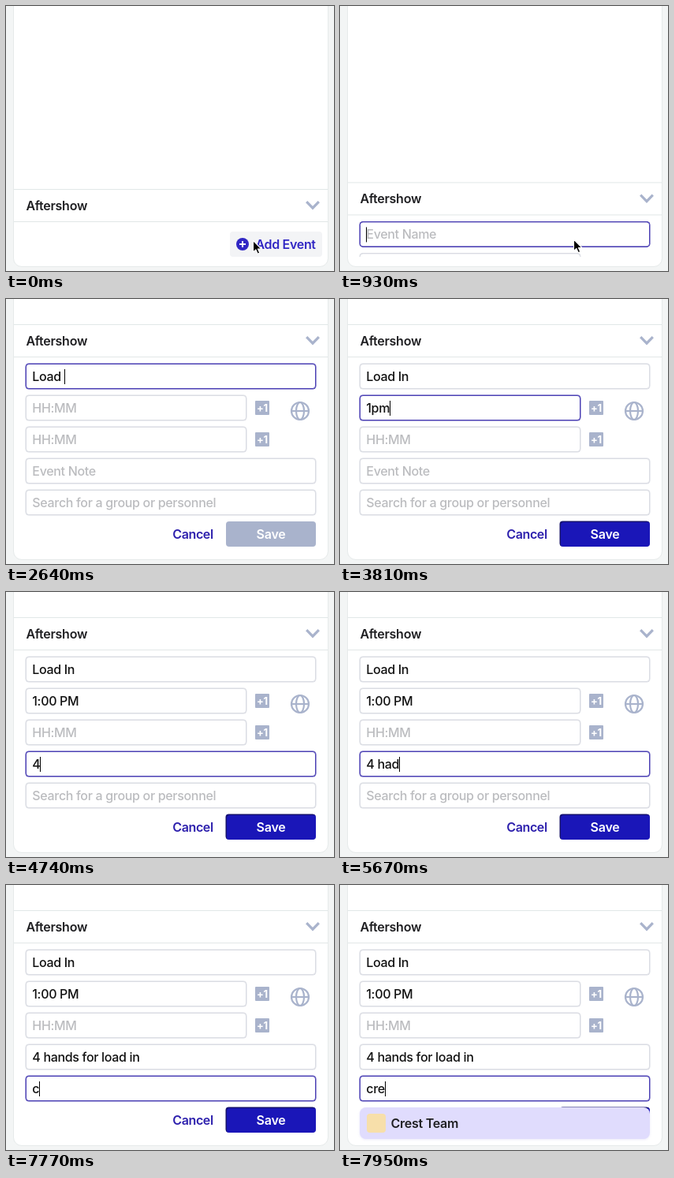
Recreate the animation shown at these times as an HTML page. Size 416x336 px, loop 8 s.

```html
<!DOCTYPE html>
<html lang="en">
<head>
<meta charset="utf-8">
<title>Add event form</title>
<style>
  :root { --mute: #a9b3cc; --blue: #3127c4; --ink: #1f1f22; }
  html, body { margin: 0; width: 100%; height: 100%; overflow: hidden; background: #f3f5f5; }
  body { font: 500 16px/20px Inter, "Liberation Sans", sans-serif; letter-spacing: -.02em; color: #111; }
  #stage { position: relative; width: 416px; height: 336px; overflow: hidden; }
  #stage * { box-sizing: border-box; }
  .abs, .field, .plus, .btn { position: absolute; }
  .strong { font-weight: 600; letter-spacing: -.016em; white-space: pre; }
  .card { left: 9px; top: -20px; width: 400px; height: 351px; background: #fff; border: 1px solid #e6eaea; border-radius: 11px; }
  #row { left: 10px; top: 32px; width: 398px; height: 42px; border: solid #e1e7e7; border-width: 1px 0; color: var(--ink); }
  #row span { left: 15.4px; top: 10px; }
  #row svg { left: 370px; top: 13px; }
  #form { inset: 0; }
  .field { --line: #dadce3; left: 25px; width: 368px; height: 32px; padding-left: 7.3px; display: flex; align-items: center;
    background: #fff; border: 1px solid var(--line); box-shadow: 0 0 0 .5px var(--line); border-radius: 4px; white-space: pre; }
  .field.short { width: 280px; }
  .field.on { --line: #4a3fb4; }
  .field i { width: 1px; height: 19px; margin-right: -1px; background: #000; visibility: hidden; }
  .field em { font-style: normal; color: #bbbcbf; }
  .plus { left: 316px; width: 18px; height: 18px; border-radius: 1px; background: var(--mute); color: #fff;
    font: 700 13px/18px Inter, "Liberation Sans", sans-serif; text-align: center; }
  .btn { display: flex; align-items: center; justify-content: center; border-radius: 4px; }
  #add { left: 284px; top: 286px; width: 117px; height: 32px; background: #f3f4f6; color: var(--blue); letter-spacing: -.02em; }
  #add svg { position: absolute; left: 8px; top: 8px; }
  #add span { position: absolute; left: 32.5px; }
  #cancel { left: 203px; top: 282px; width: 68px; height: 32px; color: #2d20ad; letter-spacing: -.025em; }
  #save { left: 279px; top: 282px; width: 114px; height: 32px; color: #fff; }
  #save.live { box-shadow: -.5px -.5px 0 #14106c, inset 1px 1px 0 #14106c; }
  #list { left: 25px; top: 282px; width: 368px; height: 40px; border-radius: 8px; background: #e0dcfd;
    box-shadow: 0 1px 3px rgba(120, 110, 220, .15); color: var(--ink); }
  #list b { position: absolute; left: 9px; top: 8px; width: 24px; height: 24px; border-radius: 4px; background: #f7dfaa; }
  #list span { position: absolute; left: 39.5px; top: 10px; }
</style>
</head>
<body>
<div id="stage">
  <div class="abs card"></div>
  <div id="row" class="abs">
    <span class="abs strong">Aftershow</span>
    <svg class="abs" width="20" height="14" fill="none" stroke="#a9b3cc" stroke-width="3.2"><path d="M1.200 2.200 9 10.200l7.800-8"/></svg>
  </div>
  <div id="add" class="btn strong">
    <svg width="16" height="16"><circle cx="8" cy="8" r="8" fill="#3127c4"/><path d="M8 4v8M4 8h8" stroke="#fff" stroke-width="2"/></svg>
    <span>Add Event</span>
  </div>
  <div id="form" class="abs">
    <div class="plus" style="top:129px">+1</div>
    <div class="plus" style="top:169px">+1</div>
    <svg class="abs" style="left:360px;top:129px" width="26" height="26" fill="none" stroke="#a9b3cc" stroke-width="2.2">
      <circle cx="13" cy="13" r="11"/><ellipse cx="13" cy="13" rx="5" ry="11"/><path d="M2 13h22"/>
    </svg>
    <div id="cancel" class="btn strong">Cancel</div>
    <div id="save" class="btn strong">Save</div>
    <div id="list" class="abs strong"><b></b><span>Crest Team</span></div>
  </div>
  <svg id="mouse" class="abs" style="left:0;top:0" width="18" height="24" overflow="visible">
    <path d="M0 0v14.500l3.400-3.100 2.300 5.300 2.500-1.100-2.300-5.100h4.500z" fill="#000" stroke="#fff" stroke-width="1.100" stroke-linejoin="round"/>
  </svg>
</div>
<script>
const LOOP = 8000;
const $ = id => document.getElementById(id);
const hints = ['Event Name', 'HH:MM', 'HH:MM', 'Event Note', 'Search for a group or personnel'];

const fields = hints.map((hint, i) => {
  const box = document.createElement('div');
  box.className = 'field' + (i === 1 || i === 2 ? ' short' : '');
  box.style.top = 82 + 40 * i + 'px';
  box.innerHTML = '<span></span><i></i><em></em>';
  $('form').insertBefore(box, $('cancel'));
  const [text, caret, ghost] = box.children;
  return { box, text, caret, ghost, hint };
});

// Each entry: time, focused field, its value from then on
const keys = [];
const type = (field, text, from, times) =>
  times.forEach((at, i) => keys.push([at, field, text.slice(0, from + i)]));

type(0, 'Load In', 0, [930, 2250, 2400, 2460, 2550, 2640, 2760, 2940]);
type(1, '1pm', 0, [3270, 3600, 3690, 3810]);
keys.push([3930, 1, '1:00 PM']);
type(2, '', 0, [3930]);
type(3, '4 hads', 0, [4320, 4740, 4800, 5100, 5160, 5220, 5310]);
keys.push([5670, 3, '4 had'], [5790, 3, '4 ha']);
type(3, '4 hands for load ', 5, Array.from({ length: 13 }, (_, i) => 5940 + 65 * i));
type(3, '4 hands for load in', 18, [6750, 6930]);
type(4, 'cre', 0, [7200, 7770, 7860, 7950]);

const ramp = (t, a, b) => Math.min(1, Math.max(0, (t - a) / (b - a)));
const ease = p => p * p * (3 - 2 * p);
const mix = (a, b, p) => a.map((v, i) => v + (b[i] - v) * p);
const within = (t, a, b) => t >= a && t < b;

function drawFields(t) {
  const values = hints.map(() => '');
  let focus = -1;
  for (const [at, field, value] of keys) {
    if (at > t) break;
    values[field] = value;
    focus = field;
  }
  const blinkOff = within(t, 1500, 1950) || within(t, 7620, 7770);
  fields.forEach((f, i) => {
    f.text.textContent = values[i];
    f.ghost.textContent = values[i] ? '' : f.hint;
    f.box.classList.toggle('on', i === focus);
    f.caret.style.visibility = i === focus && !blinkOff ? 'visible' : 'hidden';
  });
}

function draw(t) {
  const open = t >= 930;
  const drop = 200 * (1 - ease(ramp(t, 900, 1140)));
  $('row').style.transform = drop ? `translateY(${drop}px)` : 'none';
  $('add').style.visibility = open ? 'hidden' : 'visible';
  $('form').style.display = open ? 'block' : 'none';
  $('form').style.transform = drop ? `translateY(${drop}px)` : 'none';
  $('form').style.clipPath = drop ? `inset(74px 0 ${18 + drop}px 0)` : 'none';

  drawFields(t);
  $('save').style.background = `rgb(${mix([169, 179, 204], [26, 22, 184], ramp(t, 3580, 3750))})`;
  $('save').classList.toggle('live', t >= 3750);
  $('list').style.opacity = ramp(t, 7780, 7920);

  const [x, y] = t < 1350 ? mix([313.500, 297.500], [296.500, 296], ease(ramp(t, 520, 720))) : [297.500, 296];
  $('mouse').style.transform = `translate(${x}px, ${y}px)`;
  $('mouse').style.visibility = t < 2250 ? 'visible' : 'hidden';
}

let start;
function tick(now) {
  start ??= now;
  draw((now - start) % LOOP);
  requestAnimationFrame(tick);
}
draw(0);
requestAnimationFrame(tick);
</script>
</body>
</html>
```
